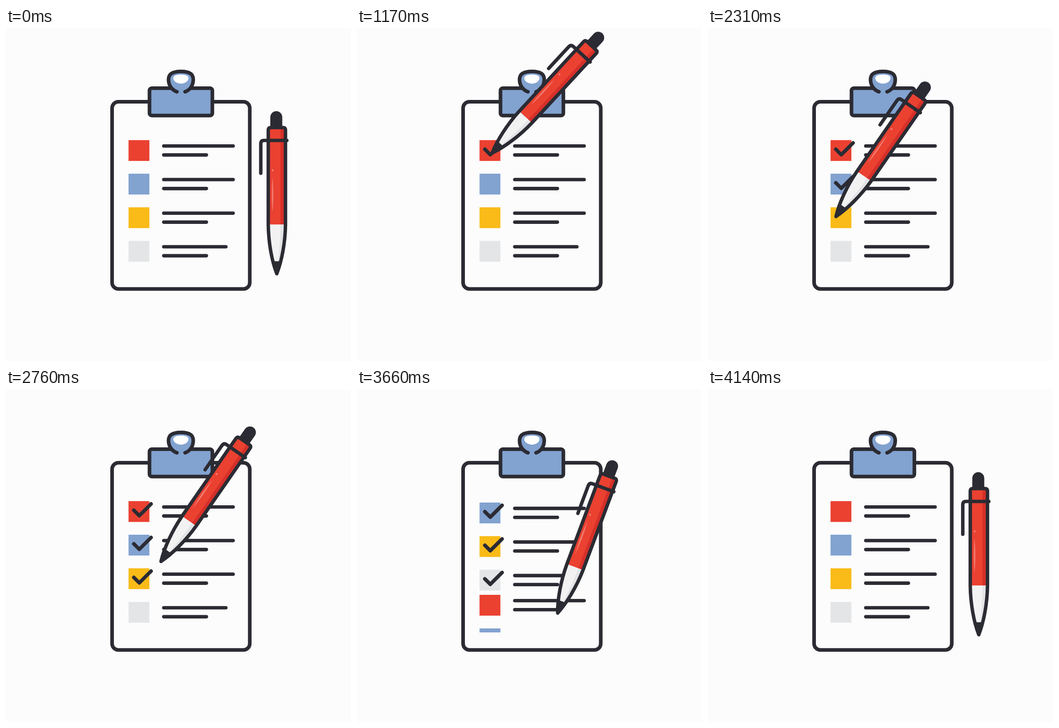
Write an HTML page with a canvas that moves like this. It is 761 px wide and 736 px high and loops after 4.5 s.

```html
<!DOCTYPE html>
<html lang="en">
<head>
<meta charset="utf-8">
<title>Checklist</title>
<style>
html, body { margin: 0; width: 100%; height: 100%; overflow: hidden; background: #fcfcfc; }
canvas { display: block; }
</style>
</head>
<body>
<canvas id="stage" width="761" height="736"></canvas>
<script>
const ctx = document.getElementById('stage').getContext('2d');
const LOOP = 4500, STEP = 30;
const INK = '#2b2b33', RED = '#ea4131', BLUE = '#82a2d0';
const COLORS = [RED, BLUE, '#fabb18', '#e3e5e6'];
const PITCH = 74.25, SCROLL = 278.2;
const TILT = 34.7;

const clamp = v => Math.max(0, Math.min(1, v));
const ease = (t, from, to) => {
  const u = clamp((t - from) / (to - from));
  return u * u * (3 - 2 * u);
};
const mix = (a, b, k) => a + (b - a) * k;

// Pen stops: time, tip x, tip y, angle in degrees
const overshoot = [18, 15, 25, 15];
const cornerTime = i => 1115 + 698 * i;
const stops = [[20, 597, 543, 0], [768, 278, 264, 45]];
for (let i = 0; i < 4; i++) {
  const y = PITCH * i, lean = i ? TILT : 43.5, o = overshoot[i];
  stops.push(
    [920 + 697 * i, 282, 268 + y, lean],
    [cornerTime(i), 294, 280 + y, lean],
    [1418 + 694 * i, 320 + o, 254 - o + y, TILT]
  );
}
stops.push([3864, 597, 543, 0]);

function penPose(t) {
  let i = 0;
  while (i < stops.length - 2 && t > stops[i + 1][0]) i++;
  const a = stops[i], b = stops[i + 1];
  const k = ease(t, a[0], b[0]);
  return [1, 2, 3].map(n => mix(a[n], b[n], k));
}

function shape(d, fill, width) {
  const p = new Path2D(d);
  if (fill) {
    ctx.fillStyle = fill;
    ctx.fill(p);
  }
  if (width) {
    ctx.lineWidth = width;
    ctx.stroke(p);
  }
}

function box(x, y, w, h, r, fill) {
  ctx.beginPath();
  ctx.roundRect(x, y, w, h, r);
  if (fill) {
    ctx.fillStyle = fill;
    ctx.fill();
  }
  ctx.lineWidth = 8;
  ctx.stroke();
}

function tick(y, k) {
  if (k <= 0) return;
  const first = 17, total = 53.5, len = k * total;
  const a = clamp(len / first), b = clamp((len - first) / (total - first));
  ctx.beginPath();
  ctx.moveTo(282, 268 + y);
  ctx.lineTo(282 + 12 * a, 268 + 12 * a + y);
  if (b > 0) ctx.lineTo(294 + 26 * b, 280 - 26 * b + y);
  ctx.lineWidth = 8;
  ctx.stroke();
}

function list(top, done) {
  for (let i = 0; i < 4; i++) {
    const y = top + PITCH * i;
    ctx.fillStyle = COLORS[i];
    ctx.fillRect(270.3, 247.8 + y, 46, 46);
    shape(`M348 ${260.7 + y}H${i < 3 ? 501 : 485}M348 ${280.6 + y}H442`, null, 7.6);
    tick(y, done(i));
  }
}

function rows(t) {
  const s = SCROLL * ease(t, 3423, 4140);
  ctx.save();
  ctx.beginPath();
  ctx.rect(240, 241, 292, 297);
  ctx.clip();
  if (s < SCROLL) list(-s, i => ease(t, cornerTime(i) - 40, cornerTime(i) + 160));
  if (s > 0) list(SCROLL - s, () => 0);
  ctx.restore();
}

function board() {
  box(234, 163, 303.7, 413.7, 14);
  box(316.5, 133, 138.7, 60.5, 5, BLUE);
  shape('M377 141C366 137 358.5 127 358.5 114C358.5 102 367 96 386 96' +
    'C405 96 413 102 413 114C413 127 406 137 395 141', BLUE, 8);
  shape('M369 111C369 105 376 103 386 103S402.5 105 402.5 111' +
    'C402.5 118 394 123 386 123S369 118 369 111Z', '#fff');
}

function pen([x, y, angle]) {
  const body = 'M578.5 435V226Q578.5 220 584 220H611Q616.5 220 616.5 226V435' +
    'C616 475 608 516 597.3 543C586.5 516 579 475 578.5 435Z';
  ctx.save();
  ctx.translate(x, y);
  ctx.rotate(angle * Math.PI / 180);
  ctx.translate(-597, -543);
  shape('M583 220V197A13.2 13.2 0 0 1 609.4 197V220Z', INK);
  ctx.save();
  ctx.clip(new Path2D(body));
  shape('M575 215H620V434.5H575Z', RED);
  shape('M605.5 215H620V434.5H605.5Z', '#d53029');
  shape('M575 434.5H620V516H575Z', '#f2f2f3');
  shape('M605.5 434.5H620V516H600Q605.5 475 605.5 434.5Z', '#e3e4e6');
  shape('M575 515.5H620V550H575Z', INK);
  ctx.restore();
  shape(body, null, 7.6);
  shape('M588 329Q591.5 368 588 408Q584.5 368 588 329Z', '#f17c70');
  shape('M588.3 312a2 2.5 0 1 1-.1 0Z', '#f17c70');
  shape('M619.5 248.5H569Q562 248.5 562 256V321', null, 7.6);
  ctx.restore();
}

function draw(t) {
  ctx.fillStyle = '#fcfcfc';
  ctx.fillRect(0, 0, 761, 736);
  ctx.strokeStyle = INK;
  ctx.lineCap = ctx.lineJoin = 'round';
  board();
  rows(t);
  pen(penPose(t));
}

const begin = performance.now();
function frame() {
  const t = (performance.now() - begin) % LOOP;
  draw(Math.floor(t / STEP) * STEP);
  requestAnimationFrame(frame);
}
frame();
</script>
</body>
</html>
```
